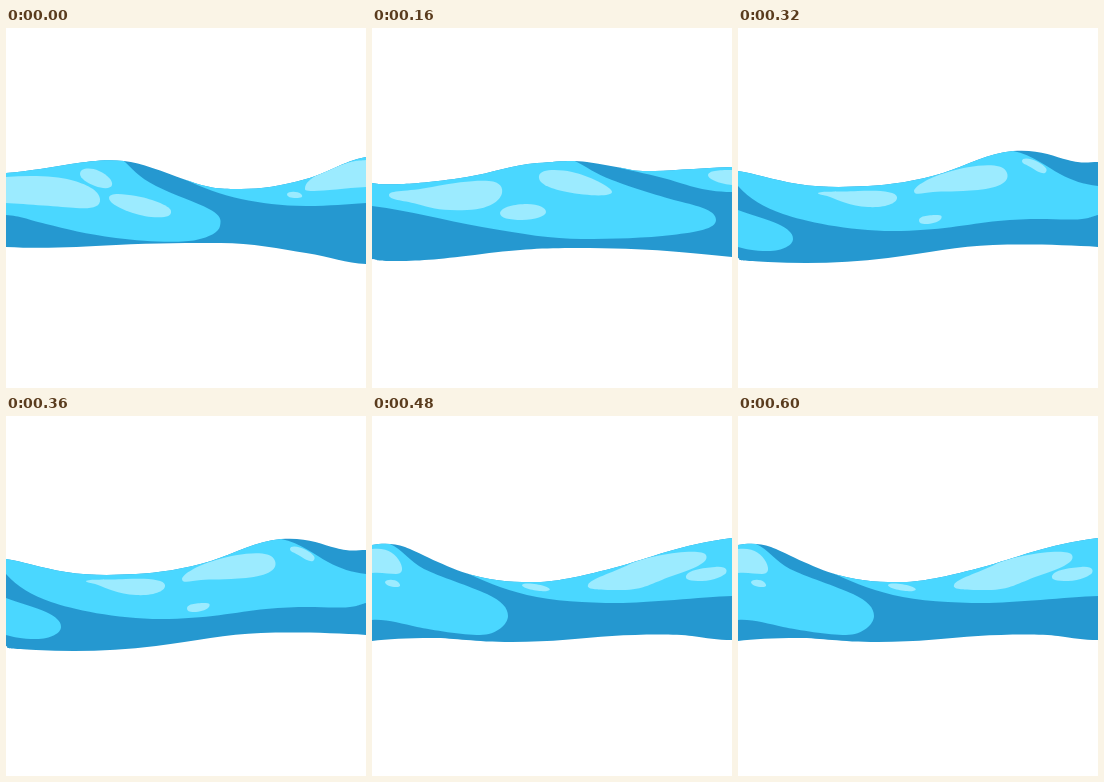
Animation of 360x360 px, one loop 640 ms. Source, as an HTML page with a canvas:

```html
<!DOCTYPE html>
<html lang="en">
<head>
<meta charset="utf-8">
<title>Rolling water</title>
<style>
html, body { margin: 0; width: 100%; height: 100%; overflow: hidden; background: #fff; }
canvas { display: block; }
</style>
</head>
<body>
<canvas id="stage" width="360" height="360"></canvas>
<script>
const HOLD = 160; // ms per pose
const DEEP = '#2598d0', LIGHT = '#4ad7ff', PALE = '#9cebff';

// Light and pale areas are clipped to the body, so they may overshoot its top edge.
const poses = [
  {
    body: 'M0 145C25 143 45 139 65 136S100 131 118 133S155 143 180 152S215 161 235 161S275 158 300 151S335 134 360 129V236C340 235 325 229 300 225S245 215 215 215S150 215 110 217S40 221 0 219Z',
    light: [
      'M0 100H118V133C125 139 132 149 150 158S190 174 203 181S215 192 214 198S204 209 190 212S140 214 110 210S60 201 40 196S15 188 0 187Z',
      'M178 151C195 159 215 167 235 171S275 178 300 178S340 176 360 175V100H178Z'
    ],
    pale: [
      'M0 149C25 147 50 148 65 152S93 162 94 171S84 181 70 180S20 176 0 175Z',
      'M74 146C74 140 84 139 93 143S107 153 106 157S97 161 89 158S74 150 74 146Z',
      'M103 170C103 164 118 166 130 168S164 177 165 183S158 190 145 189S103 178 103 170Z',
      'M299 160C300 150 320 142 335 137S350 133 360 132V159C340 160 318 163 308 163S299 162 299 160Z',
      'M281 166C282 163 292 163 295 166S295 170 290 170S281 169 281 166Z'
    ]
  },
  {
    body: 'M0 155C8 157 20 156 30 156S70 153 95 149S140 137 165 135S200 132 215 134S245 139 260 142S310 141 360 139V229C340 227 320 225 295 223S240 220 205 220S150 221 110 226S50 233 25 233S8 232 0 231Z',
    light: [
      'M0 100H203V133C215 139 222 145 240 152S290 169 310 174S344 183 344 192S325 204 300 207S240 211 210 211S150 206 110 199S40 183 0 178Z',
      'M248 140C262 143 280 147 295 151S330 164 360 164V100H248Z'
    ],
    pale: [
      'M17 167C17 162 35 164 60 159S105 152 117 153S131 160 130 165S122 181 95 182S60 180 45 176S17 172 17 167Z',
      'M167 148C168 141 185 141 200 144S240 159 240 164S215 168 195 164S166 155 167 148Z',
      'M128 185C129 179 143 176 155 176S174 180 174 184S163 192 150 192S128 190 128 185Z',
      'M336 147C337 142 350 142 360 142V157C350 156 336 152 336 147Z'
    ]
  },
  {
    body: 'M0 143C15 145 35 152 60 156S110 159 130 158S180 153 205 145S250 125 275 123S315 128 330 132S350 134 360 134V219C330 217 290 216 255 217S190 225 150 230S70 236 30 234S5 232 0 230Z',
    light: [
      'M0 158C12 171 25 179 45 186S110 203 155 203S230 196 260 193S310 191 330 191.5S352 189 360 187V158C345 156 335 153 322 146S295 127 275 123V100H0Z',
      'M0 182C12 187 30 191 40 196S55 205 55 211S45 223 30 223S8 221 0 219Z'
    ],
    pale: [
      'M80 165C82 163 100 164 120 163S158 163 159 169S148 180 130 179S100 172 92 169S80 167 80 165Z',
      'M176 163C177 158 190 150 210 144S262 133 268 143S262 160 240 162S205 163 195 164S176 168 176 163Z',
      'M284 133C284 129 293 130 300 134S310 141 308 144S300 144 294 140S284 136 284 133Z',
      'M181 192C182 187 195 187 200 187S204 190 202 192S193 196 188 196S181 195 181 192Z'
    ]
  },
  {
    body: 'M0 129C10 127 22 127 33 131S75 152 100 159S145 166 165 166S215 159 245 151S310 128 360 122V224C345 224 335 222 320 220S270 218 240 220S180 226 140 226S85 222 60 222S15 223 0 225Z',
    light: [
      'M0 100H18V128C30 133 38 146 52 153S100 171 115 178S136 192 136 200S125 219 108 219S60 214 45 211S15 203 0 204Z',
      'M90 155C110 164 130 173 155 179S215 187 245 187S330 181 360 180V100H90Z'
    ],
    pale: [
      'M0 133C15 131 24 138 28 146S30 158 24 158S8 156 0 157Z',
      'M13 166C14 163 23 163 26 166S29 171 24 171S13 169 13 166Z',
      'M150 169C152 166 166 168 172 170S180 174 175 175S150 173 150 169Z',
      'M216 169C218 163 240 157 258 148S330 131 334 139S320 153 300 160S272 174 250 174S214 174 216 169Z',
      'M314 160C316 154 330 152 343 151S355 155 354 157S342 165 330 165S313 164 314 160Z'
    ]
  }
];

const ctx = document.getElementById('stage').getContext('2d');

function fill(path, color) {
  ctx.fillStyle = color;
  ctx.fill(new Path2D(path));
}

function draw(now) {
  const { body, light, pale } = poses[Math.floor(now / HOLD) % poses.length];
  ctx.clearRect(0, 0, 360, 360);
  ctx.save();
  fill(body, DEEP);
  ctx.clip(new Path2D(body));
  light.forEach(path => fill(path, LIGHT));
  pale.forEach(path => fill(path, PALE));
  ctx.restore();
}

const start = performance.now();
function tick() {
  draw(performance.now() - start);
  requestAnimationFrame(tick);
}
tick();
</script>
</body>
</html>
```
